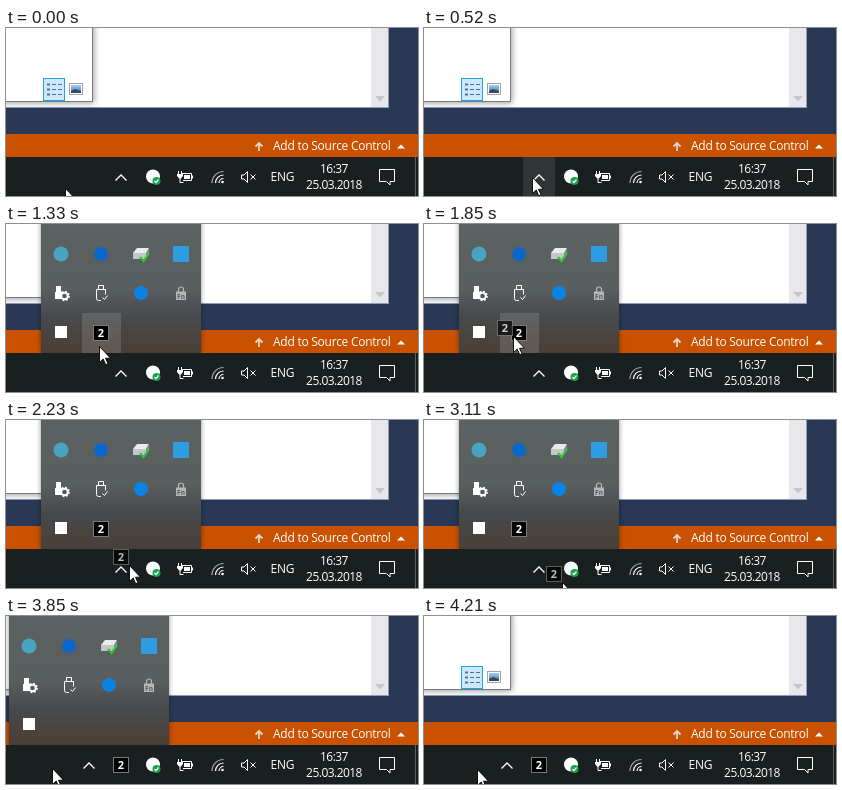
Write an HTML page that moves like this. It is 412 by 168 pixels and loops after 5.22 s.

```html
<!DOCTYPE html>
<html lang="en">
<head>
<meta charset="utf-8">
<title>Dragging a tray icon onto the taskbar</title>
<style>
  html, body { margin: 0; width: 100%; height: 100%; overflow: hidden; background: #293955; }
  svg { display: block; width: 412px; height: 168px; }
  text { font-family: "Open Sans", "Noto Sans", sans-serif; font-size: 12px; fill: #fff; }
  .num { font-size: 11px; font-weight: 700; text-anchor: middle; }
  .clock { letter-spacing: -.55px; text-anchor: middle; }
  .label { letter-spacing: -.25px; }
  .line { fill: none; stroke: #fff; }

  /* one shared 5.22 s loop; values hold unless a keyframe sets its own steps */
  .anim { animation: 5.22s step-end infinite; }
  #cursor { animation-name: cursor; }
  #popup { animation-name: popup; }
  #shift, #chevron { animation-name: shift; }
  #press { animation-name: press; }
  #cell { animation-name: cell; }
  #ghost { animation-name: ghost; }
  #hidden-item { animation-name: leave; }
  #tray-item { animation-name: arrive; }
  #shadow { filter: drop-shadow(0 0 2.5px rgba(0,0,0,.45)); }
  #files { filter: drop-shadow(1px 1px 3px rgba(0,0,0,.4)); }

  @keyframes cursor {
    0%     { transform: translate(59px, 160px); }
    1.53%  { transform: translate(59px, 160px); animation-timing-function: steps(6, jump-both); }
    9.96%  { transform: translate(108px, 149px); }
    20.11% { transform: translate(108px, 149px); animation-timing-function: steps(4, jump-both); }
    25.47% { transform: translate(93px, 122px); animation-timing-function: steps(3, jump-end); }
    30.07% { transform: translate(92px, 113px); }
    31.22% { transform: translate(92px, 112px); }
    34.28% { transform: translate(89px, 112px); animation-timing-function: steps(6, jump-end); }
    42.71% { transform: translate(123px, 145px); }
    44.24% { transform: translate(125px, 148px); }
    45.39% { transform: translate(125px, 148px); animation-timing-function: steps(2, jump-both); }
    48.46% { transform: translate(132px, 155px); }
    51.14% { transform: translate(132px, 155px); animation-timing-function: steps(1, jump-both); }
    52.68% { transform: translate(135px, 158px); }
    56.89% { transform: translate(135px, 158px); animation-timing-function: steps(2, jump-both); }
    59.57% { transform: translate(138px, 162px); }
    61.1%  { transform: translate(138px, 162px); animation-timing-function: steps(4, jump-both); }
    66.46% { transform: translate(105px, 158px); }
    68%    { transform: translate(105px, 158px); animation-timing-function: steps(4, jump-both); }
    73.74% { transform: translate(46px, 152px); }
    77.96% { transform: translate(46px, 152px); animation-timing-function: steps(2, jump-both); }
    80.64%, 100% { transform: translate(53px, 153px); }
  }
  @keyframes popup { 0%, 75.28%, 100% { opacity: 0; } 15.89% { opacity: 1; } }
  @keyframes shift { 0% { transform: none; } 61.1%, 100% { transform: translateX(-32px); } }
  @keyframes press { 0%, 23.9%, 100% { opacity: 0; } 7.1% { opacity: 1; } }
  @keyframes cell { 0%, 35.6%, 100% { opacity: 0; } 24% { opacity: 1; } }
  @keyframes ghost { 0%, 61.1%, 100% { opacity: 0; } 34.28% { opacity: .7; } }
  @keyframes leave { 0% { opacity: 1; } 61.1%, 100% { opacity: 0; } }
  @keyframes arrive { 0% { opacity: 0; } 61.1%, 100% { opacity: 1; } }
</style>
</head>
<body>
<svg viewBox="0 0 412 168" xmlns="http://www.w3.org/2000/svg">
  <defs>
    <linearGradient id="glass" x1="0" y1="0" x2="0" y2="1">
      <stop offset="0" stop-color="#5c6162"/>
      <stop offset=".5" stop-color="#595e5f"/>
      <stop offset=".72" stop-color="#464a4e"/>
      <stop offset=".86" stop-color="#4a443f"/>
      <stop offset="1" stop-color="#493f38"/>
    </linearGradient>
    <linearGradient id="sky" x1="0" y1="0" x2="0" y2="1">
      <stop offset="0" stop-color="#9fd0f5"/>
      <stop offset="1" stop-color="#3f6ea8"/>
    </linearGradient>
    <g id="counter">
      <rect x="-7.5" y="-7.5" width="15" height="15" fill="#000" stroke="#777b7c"/>
      <text class="num" y="4">2</text>
    </g>
  </defs>

  <!-- editor -->
  <rect width="412" height="168" fill="#293955"/>
  <rect width="383" height="80" fill="#8e9bbc"/>
  <rect width="382" height="79" fill="#fff"/>
  <rect x="365" width="17" height="79" fill="#e8e8ec"/>
  <path d="M369 68h10l-5 5.5z" fill="#c4c5cd"/>

  <!-- file window -->
  <rect id="files" x="-5" y="-5" width="92" height="79" fill="#777b80"/>
  <rect width="86" height="73" fill="#fff"/>
  <rect x="37.5" y="50.5" width="21" height="22" fill="#cce8ff" stroke="#26a0da"/>
  <g fill="none" stroke="#56708c">
    <path d="M41 56.5h3M41 61.5h3M41 66.5h3" stroke-width="2"/>
    <path d="M46 56.5h4M52 56.5h4M46 61.5h4M52 61.5h4M46 66.5h4M52 66.5h4"/>
  </g>
  <rect x="63.5" y="55.5" width="13" height="11" fill="#fff" stroke="#a0a4a8"/>
  <rect x="65" y="57" width="10" height="8" fill="url(#sky)"/>
  <path d="M65 65v-2l4-2 6 2v2z" fill="#37475c"/>

  <!-- status bar -->
  <rect y="106" width="412" height="23" fill="#ca5100"/>
  <path d="M253 123v-8M249.5 118.5l3.500-3.500 3.500 3.500" fill="none" stroke="#e3d3c6" stroke-width="1.800"/>
  <text class="label" x="267" y="122">Add to Source Control</text>
  <path d="M391 120.500h8l-4-4z" fill="#fff"/>

  <!-- overflow popup -->
  <g id="popup" class="anim"><g id="shift" class="anim">
    <rect id="shadow" x="35" y="-8" width="160" height="137" fill="#50555a"/>
    <rect x="35" width="160" height="129" fill="url(#glass)"/>
    <rect id="cell" class="anim" x="76" y="89" width="39" height="40" fill="#fff" fill-opacity=".13"/>

    <circle cx="55" cy="30" r="7.500" fill="#49a5bf"/>
    <circle cx="95" cy="30" r="7" fill="#0b68c9"/>
    <g transform="translate(135 30)">
      <path d="M-8-1l4-5H8L5-1z" fill="#e9ebec"/>
      <path d="M-8-1H5V5H-8z" fill="#c3c7c9"/>
      <path d="M5-1l3-5v6L5 5z" fill="#8b9092"/>
      <path d="M-1 3l3.500 4L8-1" fill="none" stroke="#35c435" stroke-width="2.200"/>
    </g>
    <rect x="167" y="22" width="16" height="16" fill="#2e9ce2"/>

    <g transform="translate(55 69)">
      <path d="M-5-7h5v6h2v7h-8v-7h1z" fill="#fff"/>
      <circle cx="3.500" cy="3" r="3.300" fill="#515657" stroke="#fff" stroke-width="2"/>
      <circle cx="3.500" cy="3" r="4.600" fill="none" stroke="#fff" stroke-width="1.500" stroke-dasharray="1.8 1.810"/>
    </g>
    <g transform="translate(95 69)" class="line">
      <path d="M-2.500-3.500v-4h5v4M0 7.500h-2.500a2 2 0 0 1-2-2v-9h9v5"/>
      <path d="M1.500 4.500l2 2 3-4"/>
    </g>
    <circle cx="135" cy="69" r="7" fill="#0a84e4"/>
    <g transform="translate(175 70)">
      <path d="M-2.500-2v-2.500a2.500 2.500 0 0 1 5 0V-2" fill="none" stroke="#b4b7b6" stroke-width="1.200"/>
      <rect x="-5" y="-2.500" width="10" height="8.500" fill="#b4b7b6"/>
      <text y="4.500" text-anchor="middle" style="font-size:6.500px;font-weight:700;fill:#55595a">Fn</text>
    </g>

    <rect x="49" y="102" width="12" height="12" fill="#fff"/>
    <g id="hidden-item" class="anim"><use href="#counter" x="95" y="109"/></g>
  </g></g>

  <!-- taskbar -->
  <rect y="129" width="412" height="39" fill="#1a1f20"/>
  <path d="M409.500 129v39" stroke="#5c6061"/>
  <rect id="press" class="anim" x="99" y="129" width="32" height="39" fill="#303536"/>
  <path id="chevron" class="line anim" d="M109.500 152.500l5.500-5.500 5.500 5.500" stroke-width="1.300"/>
  <g id="tray-item" class="anim"><use href="#counter" x="115" y="149"/></g>

  <circle cx="147" cy="148.500" r="7" fill="#fff"/>
  <g transform="translate(150.500 153)">
    <circle r="4" fill="#16a34a"/>
    <path class="line" d="M-2 0l1.500 1.600L2-1.500" stroke-width="1.200"/>
  </g>

  <g class="line">
    <path d="M176 145.500h9.500v7H177M186.500 147.500v3"/>
    <path d="M178 147h6v4h-6z" fill="#fff" stroke="none"/>
    <path d="M172.500 143v3M175.500 143v3M174 150v4.500h3.500"/>
    <path d="M171 146h6v2l-2 2.500h-2l-2-2.500z" fill="#fff" stroke="none"/>
  </g>

  <g class="line" stroke-width="1.200">
    <path d="M213 155a4.500 4.500 0 0 1 4.500-4.500M209.500 155a8 8 0 0 1 8-8"/>
    <path d="M206 155a11.500 11.500 0 0 1 11.500-11.500" stroke="#a5a9aa"/>
    <circle cx="216.500" cy="154" r="1.300" fill="#fff" stroke="none"/>
  </g>

  <g class="line">
    <path d="M235.500 147v4h2.500l3.500 3.500v-11L238 147z"/>
    <path d="M244.500 146.500l5 5M249.500 146.500l-5 5"/>
  </g>

  <text class="label" x="264.500" y="153">ENG</text>
  <text class="clock" x="328" y="145">16:37</text>
  <text class="clock" x="328" y="161">25.03.2018</text>
  <path class="line" d="M373.500 141.500h15v12h-4.500v3.500l-3.500-3.500h-7z"/>

  <!-- pointer with the dragged icon -->
  <g id="cursor" class="anim">
    <g id="ghost" class="anim"><use href="#counter" x="-8" y="-8"/></g>
    <path d="M.5.500v16l3.700-3.500 2.500 5.700 2.300-1-2.500-5.500h5z" fill="#fff" stroke="#000" stroke-width=".9"/>
  </g>
</svg>
</body>
</html>
```
